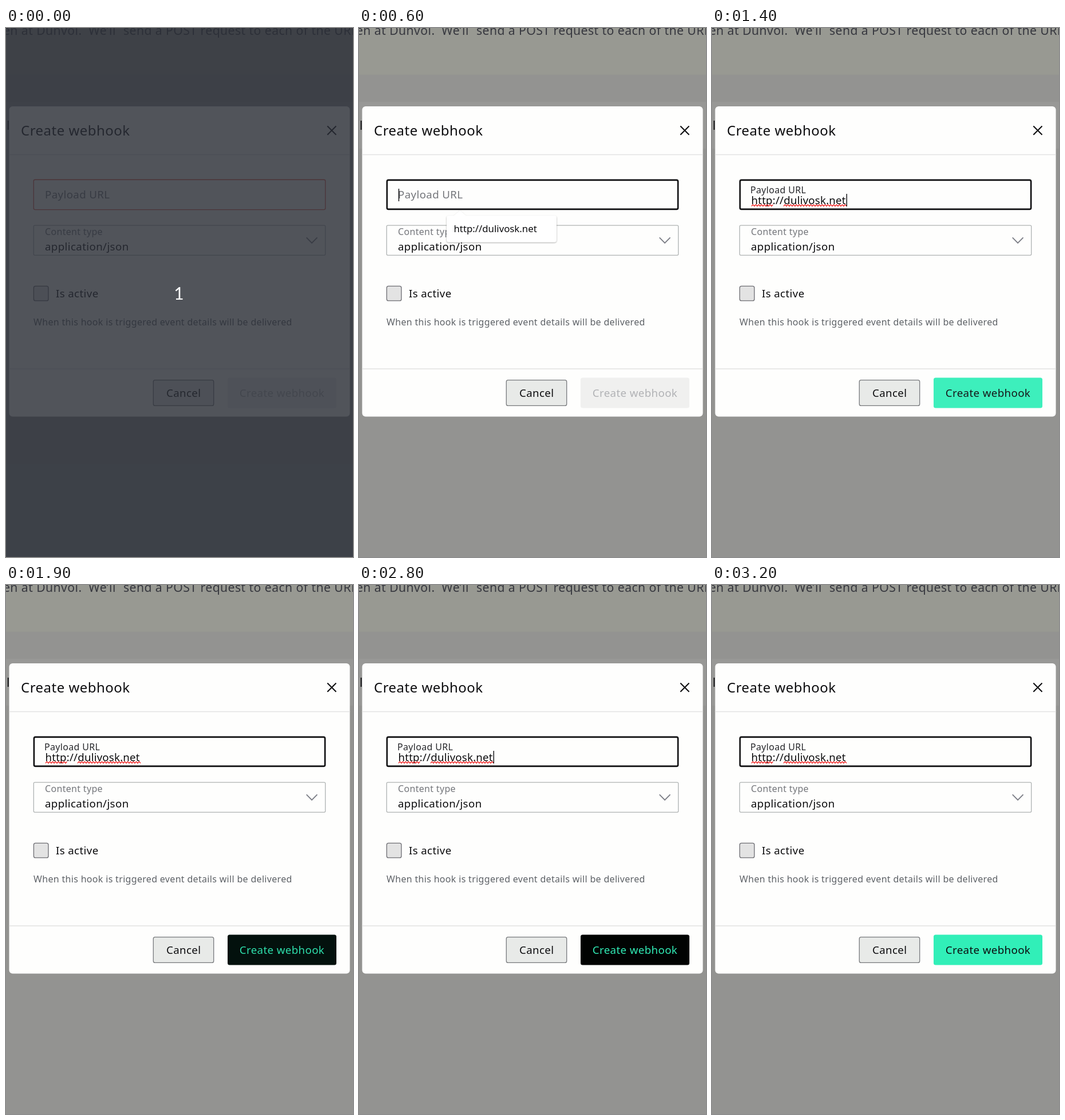
These frames come from a looping animation (606x925 px, 3.5 s). An HTML page:

```html
<!DOCTYPE html>
<html lang="en">
<head>
<meta charset="utf-8">
<title>Create webhook</title>
<style>
  html, body { margin: 0; width: 100%; height: 100%; overflow: hidden; background: #939391; }
  svg { display: block; width: 100%; height: 100%; }
  text { font-family: "Noto Sans", "Open Sans", sans-serif; font-size: 18.7px; letter-spacing: .02em; fill: #0c0c0e; }
  .small { font-size: 16px; }
  .title { font-size: 24px; }
  .page { font-size: 21.2px; fill: #37383f; }
  .mid { text-anchor: middle; }
  .grey { fill: #74767b; }
  .note { fill: #5d6166; }
  .url { letter-spacing: .01em; }
  .tip { font-size: 16.8px; letter-spacing: 0; }
  .count { font: 30px Lato, sans-serif; letter-spacing: 0; fill: #fff; }
  .rule { stroke: #e2e2e2; stroke-width: 1.3; }
  .line { fill: none; }
</style>
</head>
<body>
<svg viewBox="0 0 606 925" preserveAspectRatio="none">
  <defs>
    <filter id="shade" x="-10%" y="-20%" width="120%" height="150%">
      <feDropShadow dx="0" dy="1" stdDeviation="1.3" flood-color="#000" flood-opacity=".38"/>
    </filter>
  </defs>

  <!-- dimmed page -->
  <rect width="606" height="925" fill="#939391"/>
  <rect width="606" height="81.5" fill="#989992"/>
  <rect y="129" width="606" height="82" fill="#989896"/>
  <text class="page" y="11.5"><tspan x="-5">en at Dunvol.</tspan><tspan x="144">We’ll</tspan><tspan x="205">send a POST request to each of the URLs</tspan></text>
  <text class="page" x="1" y="178" style="fill:#0c0c0e">l</text>

  <!-- dialog -->
  <rect x="5.5" y="137" width="595" height="542.5" rx="6" fill="#fefefd"/>
  <path class="rule" d="M5.5 221.5h595M5.5 596h595"/>
  <text class="title" x="26" y="187.5">Create webhook</text>
  <path class="line" d="M561.3 171.5l15.2 15.2m0-15.2l-15.2 15.2" stroke="#0c0c0e" stroke-width="2"/>

  <rect id="field" class="line" rx="2.5"/>
  <text id="hint" class="grey" x="68" y="298">Payload URL</text>
  <g id="filled">
    <text class="small" x="67" y="289" style="fill:#26272b">Payload URL</text>
    <text class="url" x="68.5" y="307.5"></text>
  </g>
  <path id="squiggle" class="line" stroke="#f01818" stroke-width="1.3"/>
  <rect id="caret" width="1.4" height="22" fill="#0c0c0e"/>

  <rect class="line" x="48.3" y="345.2" width="509.4" height="52.1" rx="2" stroke="#afb3b3" stroke-width="1.3"/>
  <text class="small grey" x="68" y="362.3">Content type</text>
  <text x="68" y="389">application/json</text>
  <path class="line" d="M524.7 366.3l9.4 9.6 9.4-9.6" stroke="#7b7d85" stroke-width="1.8"/>

  <rect x="48.4" y="451.3" width="25.6" height="25.6" rx="3" fill="#e3e3e3" stroke="#6c6c72" stroke-width="1.3"/>
  <text x="87" y="471">Is active</text>
  <text class="small note" x="48" y="520">When this hook is triggered event details will be delivered</text>

  <rect x="257.3" y="615.6" width="105.4" height="44.8" rx="3" fill="#e8eae8" stroke="#77797c" stroke-width="1.3"/>
  <text class="mid" x="310.2" y="644.5">Cancel</text>
  <rect id="button" x="387" y="611.4" width="190" height="53.2" rx="3.5" fill="#f0f0ef"/>
  <text id="action" class="mid" x="482" y="644.5">Create webhook</text>

  <!-- suggestion popup -->
  <g id="popup">
    <path filter="url(#shade)" fill="#fff" d="M157 328h9l10.3-9 10.3 9h154.4a4 4 0 0 1 4 4v38.5a4 4 0 0 1-4 4h-184a4 4 0 0 1-4-4v-38.5a4 4 0 0 1 4-4z"/>
    <text class="url tip" x="165.5" y="357.3"></text>
  </g>

  <!-- countdown veil -->
  <g id="veil">
    <rect width="606" height="925" fill="#2a2e37" fill-opacity=".815"/>
    <text class="count mid" x="302" y="474.5">1</text>
  </g>
</svg>
<script>
  const LOOP = 3500, STEP = 100;
  const $ = id => document.getElementById(id);
  const within = (t, a, b) => t >= a && t < b;
  const show = (id, on) => $(id).setAttribute('visibility', on ? 'visible' : 'hidden');
  const set = (id, attrs) => Object.entries(attrs).forEach(([k, v]) => $(id).setAttribute(k, v));

  const scheme = 'http', host = 'dulivosk.net';
  document.querySelectorAll('.url').forEach(el => { el.textContent = `${scheme}://${host}`; });

  const zigzag = (x, end) => {
    let d = `M${x} 311.5`;
    for (let up = true; x + 2.5 <= end; up = !up, x += 2.5) d += `l2.5 ${up ? -2.6 : 2.6}`;
    return d;
  };
  set('squiggle', { d: zigzag(69, 106.5) + zigzag(125, 235.5) });

  // the border grows inwards from a fixed outer edge
  const border = (stroke, w) => set('field', {
    stroke, 'stroke-width': w,
    x: 47.6 + w / 2, y: 264.6 + w / 2, width: 510.8 - w, height: 53.6 - w
  });

  // each row: time, colour; colours ease between rows
  const MINT = '#31efb8', INK = '#0c0c0e';
  const colours = (id, rows) => {
    const frames = rows.map(([t, fill]) => ({ offset: t / LOOP, fill, easing: 'ease' }));
    const anim = $(id).animate(frames, { duration: LOOP, fill: 'both' });
    anim.pause();
    return anim;
  };
  const timeline = (off, idle, hover) => [
    [0, off], [1125, off], [1525, idle], [1630, idle],
    [2030, hover], [2790, hover], [3190, idle], [LOOP, idle]
  ];
  const tints = [
    colours('button', timeline('#f0f0ef', MINT, '#000000')),
    colours('action', timeline('#b1b2b5', INK, MINT))
  ];

  function draw(t) {
    const focus = t >= 500, typed = t >= 1100;
    show('veil', t < 100);
    border(focus ? INK : '#e25344', focus ? 2.6 : 1.3);
    show('hint', !typed);
    show('filled', typed);
    show('squiggle', t >= 1200);
    show('popup', within(t, 500, 1200));
    set('popup', { opacity: t < 600 ? .5 : 1 });
    show('caret', within(t, 500, 1700) || within(t, 2200, 2900));
    set('caret', typed ? { x: 234.6, y: 290 } : { x: 68.8, y: 281 });
    tints.forEach(a => { a.currentTime = t; });
  }

  const start = performance.now();
  function tick() {
    const t = (performance.now() - start) % LOOP;
    draw(Math.floor(t / STEP) * STEP);
    requestAnimationFrame(tick);
  }
  tick();
</script>
</body>
</html>
```
